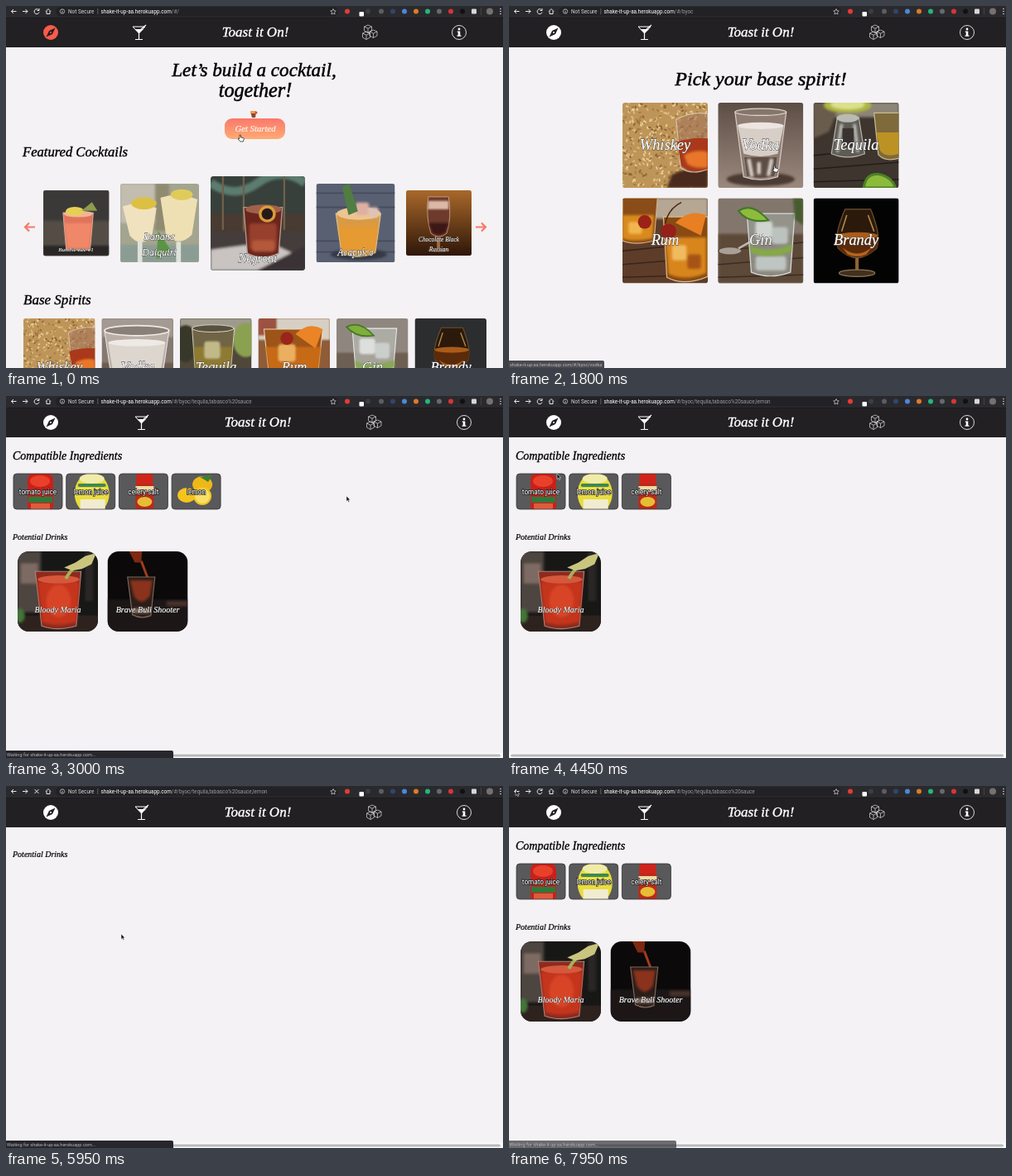
An HTML page that plays this animation: 600x438 px, repeating every 8 s.

```html
<!DOCTYPE html>
<html lang="en">
<head>
<meta charset="utf-8">
<title>Toast it On!</title>
<style>
html, body { margin: 0; width: 100%; height: 100%; overflow: hidden; background: #f4f2f5; }
svg { display: block; width: 100%; height: 100%; }
.script, .label { font-family: "Liberation Serif", serif; font-style: italic; stroke-width: .022em; stroke: currentColor; fill: currentColor; }
.label { color: #fff; text-anchor: middle; filter: drop-shadow(.6px .6px .5px #000) drop-shadow(0 0 .6px #000); }
.sans { font-family: Roboto, Arial, sans-serif; }
</style>
</head>
<body>
<svg id="stage" viewBox="0 0 600 438"></svg>
<script>
const stage = document.getElementById('stage');
const HOST = 'shake-it-up-aa.herokuapp.com';
const LOOP = 8000;

const rect = (x, y, w, h, fill, r = 0) => `<rect x="${x}" y="${y}" width="${w}" height="${h}" rx="${r}" fill="${fill}"/>`;
const oval = (x, y, rx, ry, fill, more = '') => `<ellipse cx="${x}" cy="${y}" rx="${rx}" ry="${ry}" fill="${fill}" ${more}/>`;
const dot = (x, y, r, fill, more) => oval(x, y, r, r, fill, more);
const shape = (d, fill, more = '') => `<path d="${d}" fill="${fill}" ${more}/>`;
const line = (d, color, w = 1, more = '') => shape(d, 'none', `stroke="${color}" stroke-width="${w}" ${more}`);
const script = (x, y, size, text, color = '#000', anchor = 'start') =>
  `<text class="script" x="${x}" y="${y}" font-size="${size}" color="${color}" text-anchor="${anchor}">${text}</text>`;
const label = (x, y, size, text) => `<text class="label" x="${x}" y="${y}" font-size="${size}">${text}</text>`;
const sans = (x, y, size, text, fill, more = '') =>
  `<text class="sans" x="${x}" y="${y}" font-size="${size}" fill="${fill}" ${more}>${text}</text>`;
const group = (id, body) => `<g id="${id}">${body}</g>`;
const back = fill => rect(0, 0, 100, 100, fill);
const soft = body => `<g filter="url(#soft)">${body}</g>`;
const rim = (color, w = 1.2) => `stroke="${color}" stroke-width="${w}"`;

let seed = 7;
const random = () => (seed = seed * 16807 % 2147483647) / 2147483647;

const grains = Array.from({ length: 420 }, () => {
  const x = random() * 100, y = random() * 100, turn = random() * 180 | 0;
  const place = `transform="translate(${x.toFixed(1)} ${y.toFixed(1)}) rotate(${turn})"`;
  return oval(0, 0, 2, 1, ['#dcb77e', '#8f6536', '#e8cc98', '#a67a45'][random() * 4 | 0], place);
}).join('');

const planks = color => line('M0 62L100 52M0 78L100 70M0 93L100 90', color, 1.5);

const brandy = bg => back(bg) +
  shape('M37 13H67Q80 45 74 59Q62 70 51 70Q40 70 29 59Q23 45 37 13Z', '#2b1a0c', rim('#6d5030')) +
  shape('M27 44H76Q78 56 70 63Q51 75 33 63Q25 56 27 44Z', '#5a2a0b') + oval(51.5, 44, 24, 4, '#a95c18') +
  shape('M34 58Q51 72 68 58L62 66Q51 71 40 66Z', '#b3641c') + line('M39 20L33 39M64 20L71 39', '#b98b48', 1.5) +
  line('M51 70V86', '#8f6336', 4) + oval(51, 88, 21, 4, '#42301f', rim('#8f7654'));

// Pictures drawn in a 100 by 100 box.
const pics = {
  whiskey: back('#be9558') + grains + soft(shape('M58 84Q80 74 100 78V100H52Z', '#4a2a1a')) +
    shape('M63 20Q80 10 100 13V78Q80 86 68 76Z', '#a3765a99', rim('#d9bfa5')) +
    shape('M64 46Q82 40 100 42V78Q80 84 69 74Z', '#a9391a') + soft(shape('M72 62Q86 54 100 58V76Q84 78 76 72Z', '#e8772c')),
  vodka: back('url(#stone)') + soft(oval(50, 90, 40, 8, '#4b3a31')) +
    shape('M20 11H80L70 87Q50 94 30 87Z', '#8f7d72', rim('#d5cbc5')) +
    shape('M23 27H77L70 60Q50 66 30 60Z', '#d8cec8') + oval(50, 27, 27, 4, '#ece5e0') +
    oval(50, 11, 30, 4, '#86756b', rim('#e0d8d3')) +
    shape('M31 64H69L66 86Q50 90 34 86Z', '#5d4d44') + soft(line('M36 66L40 87M48 70V84M63 66L59 86', '#e3dad4', 4)),
  tequila: back('#3d352e') + soft(rect(0, 0, 100, 17, '#8c8578') + shape('M0 0H32L18 34L0 42Z', '#6b5c4d')) + planks('#241d18') +
    soft(oval(40, 3, 28, 9, '#aeb540') + oval(40, 2, 20, 6, '#dbe08a')) +
    shape('M21 60L28 17H53L60 60Q40 68 21 60Z', '#5e5a54', rim('#b5b4ae')) + oval(40, 18, 13, 5, '#b9bab3') +
    soft(line('M33 25L28 58M48 25L52 58', '#cfcfc9', 3)) + rect(34, 30, 13, 22, '#38332e') +
    shape('M71 12H101V65Q84 70 76 61Z', '#7e6a3a', rim('#c9bb90')) + shape('M74 35H100V60Q84 65 78 56Z', '#bd9224') +
    shape('M59 100Q61 83 76 84Q92 87 96 100Z', '#8cba3a', rim('#4d8227', 3)),
  rum: back('#5d3d2a') + soft(rect(0, 0, 100, 24, '#b5a793')) + planks('#3a2419') +
    shape('M0 0H41L37 50Q15 56 0 50Z', '#8a4c18', rim('#d1ae7c')) + soft(shape('M0 20H37L35 47Q12 52 0 47Z', '#d88a1c')) +
    shape('M48 22H100V92Q72 104 52 93Z', '#8a4a14', rim('#d9bd90')) + soft(shape('M50 46H98V88Q73 98 54 89Z', '#d8861a')) +
    soft(rect(58, 55, 17, 18, '#f0bb60', 3) + rect(76, 66, 16, 17, '#a85212', 3) + rect(7, 28, 16, 14, '#f2b650', 3)) +
    dot(26, 28, 8, '#9b2219') + dot(54, 39, 9, '#96201a') + shape('M62 29Q79 12 98 20L92 44Z', '#e87f22') + line('M50 30Q54 12 69 5', '#4c2115', 1.5),
  gin: back('#83766c') + soft(rect(0, 42, 100, 58, '#5d4939')) + planks('#3a2c22') + oval(14, 62, 13, 4, '#a8a098') + line('M24 59L42 49', '#bdb7b0', 2.5) +
    shape('M34 18H90L85 87Q61 96 39 87Z', '#989a93cc', rim('#d8dcd9')) +
    soft(rect(44, 27, 20, 20, '#d0d5d1', 4) + rect(63, 34, 19, 20, '#bcc2be', 4) + rect(44, 68, 36, 17, '#bfc5c3', 4)) +
    shape('M24 15Q40 4 59 26Q35 30 24 15Z', '#8dbb3c', rim('#44772a', 2)) +
    soft(shape('M37 56Q62 66 87 54L85 63Q61 72 39 64Z', '#84aa42')) + soft(shape('M88 0H100V32L90 25Z', '#465b2e')),
  brandy: brandy('#030303'),
  vodkaHome: back('#857a72') + soft(rect(0, 0, 100, 26, '#a49a92') + rect(0, 62, 100, 38, '#6c5b50')) +
    shape('M4 17H94L82 100H16Z', '#b9afa7', rim('#eae5e0')) + shape('M9 34H89L82 76H16Z', '#ddd6cf') +
    oval(49, 17, 45, 7, '#8b8078', rim('#efeae6', 2)) + oval(49, 34, 40, 5, '#efe9e4'),
  tequilaHome: back('#4f4738') + soft(rect(0, 0, 100, 24, '#a09a8c') + oval(92, 30, 18, 24, '#8aa151') + oval(8, 35, 17, 26, '#39382a')) +
    shape('M17 14H76L70 84Q46 92 22 84Z', '#6f6444', rim('#d3cfbf')) + soft(shape('M19 40H73L69 82Q46 88 23 82Z', '#8f7a30') + rect(34, 32, 22, 24, '#c2b989', 4)) +
    oval(46, 14, 29, 5, '#57513d', rim('#d3cfbf')),
  rumHome: back('#8e5c39') + soft(rect(0, 0, 100, 30, '#d8cfc4') + rect(0, 0, 26, 24, '#9d5140')) +
    shape('M8 15H90L82 88Q48 98 16 88Z', '#9c5418', rim('#ecd9bb')) + soft(shape('M10 40H88L82 85Q48 94 17 85Z', '#c76a16') + rect(28, 36, 24, 24, '#eab060', 4)) +
    shape('M52 22Q70 4 90 15L80 42Z', '#ea8427') + dot(40, 28, 9, '#9b241b'),
  ginHome: back('#8f877f') + soft(rect(0, 48, 100, 52, '#6d5e51')) +
    shape('M22 14H84L78 88Q52 96 28 88Z', '#b5b5aecc', rim('#e9ebe9')) +
    soft(rect(32, 28, 22, 22, '#dcdfdc', 4) + rect(54, 34, 20, 22, '#cbcfcc', 4) + shape('M25 60Q52 68 81 58V68Q52 76 27 68Z', '#88a852')) +
    shape('M14 12Q32 2 52 24Q28 28 14 12Z', '#7fae3a', rim('#44772a', 2)),
  brandyHome: brandy('#2b2d2e'),
  bumble: back('#544d46') + soft(rect(0, 0, 100, 46, '#3a3838') + rect(0, 84, 100, 16, '#2b2725')) +
    shape('M30 34H76L71 91H35Z', '#e0745a', rim('#d0b5a8')) + soft(shape('M32 50H74L70 88H36Z', '#f08767')) + oval(53, 36, 22, 5, '#f1b49b') +
    oval(48, 32, 14, 7, '#e6cf55') + shape('M58 31L74 18L82 31Z', '#8d9c4c'),
  banana: back('#a3a58e') + soft(rect(0, 0, 46, 50, '#c3bdb0') + rect(0, 78, 100, 22, '#8b9c94') + rect(44, 0, 18, 60, '#8f8a70')) +
    shape('M3 29Q24 21 46 31L40 68Q25 82 12 66Z', '#f0e2be') + shape('M51 18Q73 10 98 20L91 65Q74 82 58 65Z', '#efe0b4') +
    rect(22, 72, 6, 28, '#dfe2da') + rect(71, 74, 6, 26, '#dfe2da') + oval(30, 25, 16, 8, '#dcc044') + oval(78, 14, 14, 7, '#e0cb5a') +
    shape('M48 60L65 86L46 96Z', '#5c9445'),
  negroni: back('#37403b') + soft(line('M0 7Q25 25 50 7T100 7', '#5c7c70', 9) + rect(0, 40, 100, 20, '#4a3a30')) + line('M13 0V57M35 0V60M78 0V57', '#6f6049', 2) +
    soft(rect(0, 58, 100, 42, '#453d3a') + shape('M0 78L62 70L100 88V100H0Z', '#c9c4c2') + shape('M49 100L100 74V100Z', '#3a3334')) +
    shape('M35 33H76L72 82Q55 90 39 82Z', '#6a261c', rim('#b59890')) + soft(rect(41, 50, 29, 28, '#97402f', 3) + rect(44, 68, 24, 12, '#b3583a', 3)) +
    oval(56, 35, 19, 5, '#a0614a') + dot(60, 40, 9, '#d99d38') + dot(60, 40, 6, '#261a19'),
  acapulco: back('#586072') + line('M0 12H100M0 30H100M0 73H100M0 87H100', '#444c5c', 2) + soft(oval(54, 90, 36, 7, '#343743')) +
    shape('M25 38H82L75 88Q52 98 32 87Z', '#d99a45', rim('#dcc596')) + soft(shape('M28 54H79L74 87Q52 95 33 86Z', '#e59a30')) + oval(54, 38, 28, 8, '#ecc592') +
    soft(rect(50, 24, 17, 16, '#dfb0a2', 3) + rect(66, 30, 13, 13, '#e0c2b6', 3)) + shape('M33 4L42 0L53 35L41 40Z', '#517c42'),
  russian: back('url(#amber)') + shape('M34 10H65Q70 43 62 66Q50 76 38 66Q30 43 34 10Z', '#6d3a2c', rim('#c89a80')) +
    soft(shape('M34 16H65V29H33Z', '#dcb9a6') + shape('M35 50H65L60 65Q50 72 40 65Z', '#3c1812')) + rect(47, 72, 5, 18, '#a3683e') + oval(50, 92, 17, 3, '#6b3a20'),
  maria: back('#171716') + soft(rect(0, 0, 29, 76, '#4e4440') + rect(4, 15, 21, 25, '#7d6a62') + rect(84, 0, 10, 62, '#292626')) + rect(0, 80, 100, 20, '#2d221e') +
    shape('M22 25H79L73 93Q49 100 30 93Z', '#8e2a1e', rim('#a88278')) + soft(shape('M25 38H77L73 88Q48 95 31 88Z', '#c5351f') + oval(51, 62, 15, 20, '#d84528')) +
    oval(51, 35, 26, 5, '#d5583c') + line('M60 34Q72 12 93 10', '#a5b058', 4) + shape('M58 20L72 14L84 6L98 2L92 16L80 22L68 24Z', '#c9c57e') + soft(oval(3, 80, 6, 9, '#437538')),
  bull: back('#0b0909') + soft(shape('M0 60H100V100H0Z', '#1c1715') + rect(74, 62, 26, 6, '#46302c')) + line('M42 12L50 33', '#a23c1c', 3) +
    shape('M27 0L43 0L42 14L34 14Z', '#7e2912') + shape('M25 32H59L54 80Q42 85 31 79Z', '#2b1d19', rim('#7d685c')) +
    soft(shape('M28 36H56L53 55Q43 70 33 56Z', '#8a331b') + rect(32, 71, 21, 6, '#86705f'))
};
const pic = (name, x, y, size, clip = 'corner') =>
  `<g transform="translate(${x} ${y}) scale(${size / 100})"><g clip-path="url(#${clip})">${pics[name]}</g></g>`;

// Ingredient pictures, drawn inside a 59 by 43 tile.
const foods = {
  'tomato juice': rect(17, 0, 31, 46, '#c9201a', 7) + oval(32, 9, 12, 7, '#e8402a') + rect(18, 28, 29, 7, '#2c7a3c') + rect(21, 36, 23, 8, '#e05a3c'),
  'lemon juice': oval(31, 24, 21, 25, '#e9dc3c') + oval(31, 6, 15, 6, '#f0eba8') + rect(14, 12, 34, 4, '#3b8a56', 2) + rect(14, 17, 34, 9, '#f1e24a') + rect(17, 31, 30, 12, '#f1ecd0'),
  'celery salt': rect(21, 0, 20, 14, '#d0241b', 2) + rect(20, 12, 22, 31, '#b92a1a', 2) + rect(20, 15, 22, 7, '#ead9a5') + oval(31, 34, 9, 6, '#e6bd34'),
  lemon: oval(18, 26, 11, 9, '#f4c41c') + oval(37, 13, 12, 10, '#edb818') + dot(37, 27, 10, '#f9e066', rim('#f4c420', 2)) + shape('M34 4L49 1L44 10Z', '#3c7f32'),
  'tabasco sauce': rect(25, 0, 9, 10, '#c32b1b') + rect(21, 8, 17, 35, '#aa2615', 4) + rect(21, 20, 17, 12, '#eee2c5'),
  'orange juice': rect(18, 3, 23, 40, '#ed9824', 4) + rect(20, 17, 19, 11, '#f9dfaa'),
  'lime juice': oval(30, 25, 17, 20, '#8ab536') + rect(17, 20, 26, 11, '#d8e5a5')
};
const tile = (name, i) => `<g transform="translate(${9 + i * 63.7} 94)">` + rect(0, 0, 59, 43, '#59595b', 4) +
  `<g clip-path="url(#tileClip)">${foods[name]}</g>` + `<rect width="59" height="43" rx="4" fill="none" ${rim('#333', .8)}/>` +
  sans(29.5, 25, 8.2, name, '#fff', 'text-anchor="middle" stroke="#222" stroke-width="1.5" paint-order="stroke"') + '</g>';
const drink = (name, title, i) => pic(name, 14 + i * 108.5, 188, 97, 'round') + label(62.5 + i * 108.5, 262, 10, title);
const tiles = (...names) => script(8, 77, 14, 'Compatible Ingredients') + names.map(tile).join('');
const drinks = n => script(8, 174, 10, 'Potential Drinks') +
  [['maria', 'Bloody Maria'], ['bull', 'Brave Bull Shooter']].slice(0, n).map(([p, t], i) => drink(p, t, i)).join('');

const spirits = ['Whiskey', 'Vodka', 'Tequila', 'Rum', 'Gin', 'Brandy'];
const homePic = s => pics[s + 'Home'] ? s + 'Home' : s;
const base = ['tomato juice', 'lemon juice', 'celery salt'];
const arrow = (x, dir) => line(`M${x - 6 * dir} 267.5H${x + 6 * dir}M${x + dir} 262.5L${x + 6 * dir} 267.5L${x + dir} 272.5`, '#f9786a', 2.2);

const scenes = {
  home: script(299.5, 85, 23.1, 'Let’s build a cocktail,', '#000', 'middle') + script(301, 110, 24.2, 'together!', '#000', 'middle') +
    rect(264, 136, 73, 25, 'url(#coral)', 9) + script(301, 152, 10.7, 'Get Started', '#fff2ec', 'middle') +
    shape('M295 128H302L301 135H297Z', '#8d4737') + rect(295, 127, 7, 3, '#f39b47') + dot(302, 129, 1.5, '#d34d35') +
    script(20, 182, 16.6, 'Featured Cocktails') + script(21, 361, 17, 'Base Spirits') + arrow(29, -1) + arrow(573, 1) +
    pic('bumble', 45, 223, 79.5) + label(84.5, 297, 7, 'Bumble Bee #1') +
    pic('banana', 138, 215, 95) + label(185, 283, 12, 'Banana') + label(185, 302, 12, 'Daiquiri') +
    pic('negroni', 247, 206, 114) + label(304, 310, 14.3, 'Negroni') +
    pic('acapulco', 374.5, 215, 95) + label(422, 302, 11.5, 'Acapulco') +
    pic('russian', 483, 223, 79) + label(522.5, 285, 7.4, 'Chocolate Black') + label(522.5, 297, 7.4, 'Russian') +
    spirits.map((s, i) => pic(homePic(s.toLowerCase()), 21 + i * 94.5, 378, 86.5) + label(64.5 + i * 94.5, 442, 16.7, s)).join(''),
  loading: dot(312, 83, 11, '#f7b477', rim('#4b4a50', 2)) + line('M312 83L305 76M312 83L320 76M312 83H321M312 83L319 91', '#eeca91', .8) +
    shape('M289 83H312L309 110Q308.500 113 306 113H295Q292.500 113 292 110Z', '#f8f8fa', rim('#333238', 2)) +
    shape('M291 90H310L307.500 111H293.500Z', '#65afb9') + line('M294 92L305 110M299 91L307 106M292.500 99L299 110M304 91L308 98', '#466c9b', .8) + line('M285 73L301 101', '#302f35', 2),
  pick: script(304, 96, 24, 'Pick your base spirit!', '#000', 'middle') +
    spirits.map((s, i) => {
      const x = 137 + i % 3 * 115.3, y = 117 + (i > 2) * 115.5;
      return pic(s.toLowerCase(), x, y, 103) + label(x + 51.5, y + 56.5, 18.4, s);
    }).join(''),
  tequila: tiles(...base, 'lemon', 'orange juice', 'lime juice', 'tabasco sauce') + drinks(2),
  four: tiles(...base, 'lemon') + drinks(2),
  three: tiles(...base) + drinks(1),
  shell: script(8, 86, 10, 'Potential Drinks'),
  returned: tiles(...base) + drinks(2),
  blank: ''
};

const cubeAt = (x, y) => `M${x} ${y - 5}l4.500 2v5l-4.500 2.500l-4.500 -2.500v-5zM${x - 4.5} ${y - 3}l4.500 2.200l4.500 -2.200M${x} ${y - .8}v5.300`;
const icons = {
  compass: dot(0, 0, 9, 'currentColor') + shape('M5.500 -5.500L2 2L-5.500 5.500L-2 -2Z', '#222022') + dot(0, 0, 1, 'currentColor'),
  glass: line('M-8 -7H7L-.5 1Z', '#fff', 1) + shape('M-5.500 -4H5L-.5 1Z', '#fff') + line('M-.5 0V8M-5 8.500H4M2 -4L8 -9', '#fff', 1.2),
  cubes: line(cubeAt(-4, 4) + cubeAt(4.5, 2) + cubeAt(-2, -4), '#ddd', .7),
  info: dot(0, 0, 8.5, 'none', rim('#eee', .9)) + dot(0, -4, 1.4, '#fff') + shape('M-2.200 -1.500H1.300V3.500H2.500V4.800H-2.500V3.500H-1.300V-.2H-2.200Z', '#fff')
};
const extensions = [[412, '#e63b32'], [437, '#3c3e42'], [453, '#5a5d62'], [467, '#34456b'], [481, '#4a88dc'], [495, '#dc7b2a'],
  [509, '#22b77c'], [523, '#66696d'], [537, '#d83535'], [551, '#111']];

const chrome = rect(0, 0, 600, 14.5, '#2a2a2e') + rect(60, 1, 341, 11.5, '#222226', 6) + rect(0, 14, 600, 36, '#222022') + rect(0, 14, 600, .7, '#17171a') +
  line('M12.500 6.500H6.500M9 4L6.500 6.500L9 9M20 6.500H26M23.500 4L26 6.500L23.500 9', '#e9e9eb', 1) +
  group('reload', line('M39.600 5A3 3 0 1 0 40 7.500M40 3V5.500H37.500', '#e9e9eb', 1)) + group('stop', line('M34.500 4L39.500 9M39.500 4L34.500 9', '#e9e9eb', 1)) +
  line('M48 6.500L51 3.500L54 6.500M49 6V9.500H53V6', '#e9e9eb', 1) +
  dot(68, 6.5, 2.7, 'none', rim('#ddd', .7)) + line('M68 6V8.300M68 4.500V5.200', '#ddd', .8) +
  sans(75, 8.8, 6.4, 'Not Secure', '#d8d8da') + rect(110.5, 3, .7, 7, '#777') +
  `<text class="sans" x="114.500" y="8.800" font-size="6.350" fill="#fff">${HOST}<tspan id="path" fill="#9a9a9f"></tspan></text>` +
  line('M395 3.500L396 5.700L398.300 6L396.600 7.600L397 10L395 8.800L393 10L393.400 7.600L391.700 6L394 5.700Z', '#ddd', .7) +
  extensions.map(([x, c]) => dot(x, 6.5, 3, c)).join('') + rect(426.5, 7, 5.5, 5.5, '#fff', 1) + rect(562, 3.5, 6, 6, '#d7d7d9', 1) +
  rect(573, 2, .6, 9, '#555') + dot(584, 6.5, 4, '#77706d') + [3.5, 6.5, 9.5].map(y => dot(597, y, .8, '#ddd')).join('') +
  Object.keys(icons).map(k => group(k, icons[k])).join('') + group('brand', script(0, 0, 17, 'Toast it On!', '#fff', 'middle'));

const clip = (id, w, h, r) => `<clipPath id="${id}"><rect width="${w}" height="${h}" rx="${r}"/></clipPath>`;
const fade = (id, a, b) => `<linearGradient id="${id}" x2="0" y2="1"><stop stop-color="${a}"/><stop offset="1" stop-color="${b}"/></linearGradient>`;

stage.innerHTML = `<defs>${clip('corner', 100, 100, 3)}${clip('round', 100, 100, 14)}${clip('tileClip', 59, 43, 4)}` +
  '<filter id="soft"><feGaussianBlur stdDeviation="1.5"/></filter>' +
  fade('stone', '#5d4e45', '#9c897e') + fade('amber', '#a9682a', '#2e1608') + fade('coral', '#fa786c', '#ffab72') + '</defs>' +
  rect(0, 0, 600, 438, '#f4f2f5') + Object.entries(scenes).map(([k, v]) => group(k, v)).join('') + chrome +
  group('scroll', rect(0, 431.5, 600, 6.5, '#fafafa') + rect(2, 433.5, 595, 3, '#b9b9bb', 1.5)) +
  group('status', `<rect id="statusBox" x="-3" y="429" height="12" rx="2"/>` + sans(1, 435.5, 5.55, '', '#b9b9bd', 'id="statusText"')) +
  group('pointer', shape('M0 0V6.500L1.500 5.200L2.600 7.600L3.700 7.100L2.600 4.800H4.600Z', '#111', rim('#fff', .5))) +
  group('hand', shape('M0 0Q1.300 -.7 1.500 1V3L4.500 3.600Q5.500 4 5 6L4.300 8H.8L-2 5Q-1.800 3.900 -.2 4.800Z', '#fff', rim('#111', .7)));

const $ = id => document.getElementById(id);
const LEMON = '/#/byoc/tequila,tabasco%20sauce,lemon';
const SAUCE = '/#/byoc/tequila,tabasco%20sauce';

// Start time, scene, path, still loading
const timeline = [
  [0, 'home', '/#/'], [450, 'loading', '/#/byoc'], [1100, 'pick', '/#/byoc'],
  [2250, 'tequila', '/#/byoc/tequila'], [2750, 'four', SAUCE], [3900, 'three', LEMON],
  [5200, 'blank', LEMON, true], [5550, 'shell', LEMON, true], [6200, 'three', LEMON], [7500, 'returned', SAUCE]
];
// Start, end, text, width, colour
const WAIT = `Waiting for ${HOST}...`;
const statuses = [
  [500, 900, HOST + '/#/byoc', 202, '#4b4a4f'], [1500, 1900, HOST + '/#/byoc/vodka', 115, '#4b4a4f'],
  [1980, 2250, HOST + '/#/byoc/tequila', 119, '#4b4a4f'], [2800, 3300, WAIT, 202, '#27262d'],
  [3920, 4200, WAIT, 202, '#27262d'], [5300, 6300, WAIT, 202, '#27262d'], [7520, 7900, WAIT, 202, '#27262d']
];
const moves = [[0, 282, 156], [350, 282, 156], [600, 282, 150], [1150, 282, 150], [1800, 320, 193], [2150, 410, 150], [2300, 410, 150],
  [2600, 411, 121], [3050, 411, 121], [3650, 228, 115], [3950, 228, 115], [4450, 58, 94], [4900, 37, 5], [5250, 37, 5],
  [5950, 139, 179], [6700, 139, 179], [7350, 8, 5], [LOOP, 8, 5]];
const hands = [[0, 450], [1500, 2250], [2550, 2750], [3500, 3900]];

const show = (id, on) => $(id).setAttribute('display', on ? 'inline' : 'none');
const place = (id, x, y) => $(id).setAttribute('transform', `translate(${x} ${y})`);

function cursorAt(t) {
  const i = moves.findIndex(m => m[0] > t);
  const [t0, x0, y0] = moves[i - 1], [t1, x1, y1] = moves[i];
  const p = (t - t0) / (t1 - t0), k = p * p * (3 - 2 * p);
  return [x0 + (x1 - x0) * k, y0 + (y1 - y0) * k];
}

function draw(t) {
  const [, scene, path, busy] = timeline.filter(s => s[0] <= t).pop();
  Object.keys(scenes).forEach(id => show(id, id === scene));
  $('path').textContent = path;
  show('reload', !busy);
  show('stop', busy);

  const home = scene === 'home';
  $('compass').setAttribute('color', home ? '#fa5b4b' : '#fff');
  const spots = home ? [54, 161, 439, 547] : [54, 164, 444, 553];
  Object.keys(icons).forEach((id, i) => place(id, spots[i], 32));
  place('brand', home ? 301 : 304, 37);
  show('scroll', t >= 2250);

  const status = statuses.find(s => t >= s[0] && t < s[1] + 150);
  show('status', status);
  if (status) {
    const [, end, text, width, color] = status;
    $('statusText').textContent = text;
    $('statusBox').setAttribute('width', width + 3);
    $('statusBox').setAttribute('fill', color);
    $('status').setAttribute('opacity', t < end ? 1 : Math.max(.65, 1 - (t - end) / 150));
  }

  const hand = hands.some(([a, b]) => t >= a && t < b);
  const [x, y] = cursorAt(t);
  show('hand', hand);
  show('pointer', !hand);
  place(hand ? 'hand' : 'pointer', x, y);
}

const start = performance.now();
function tick() {
  draw((performance.now() - start) % LOOP);
  requestAnimationFrame(tick);
}
tick();
</script>
</body>
</html>
```
